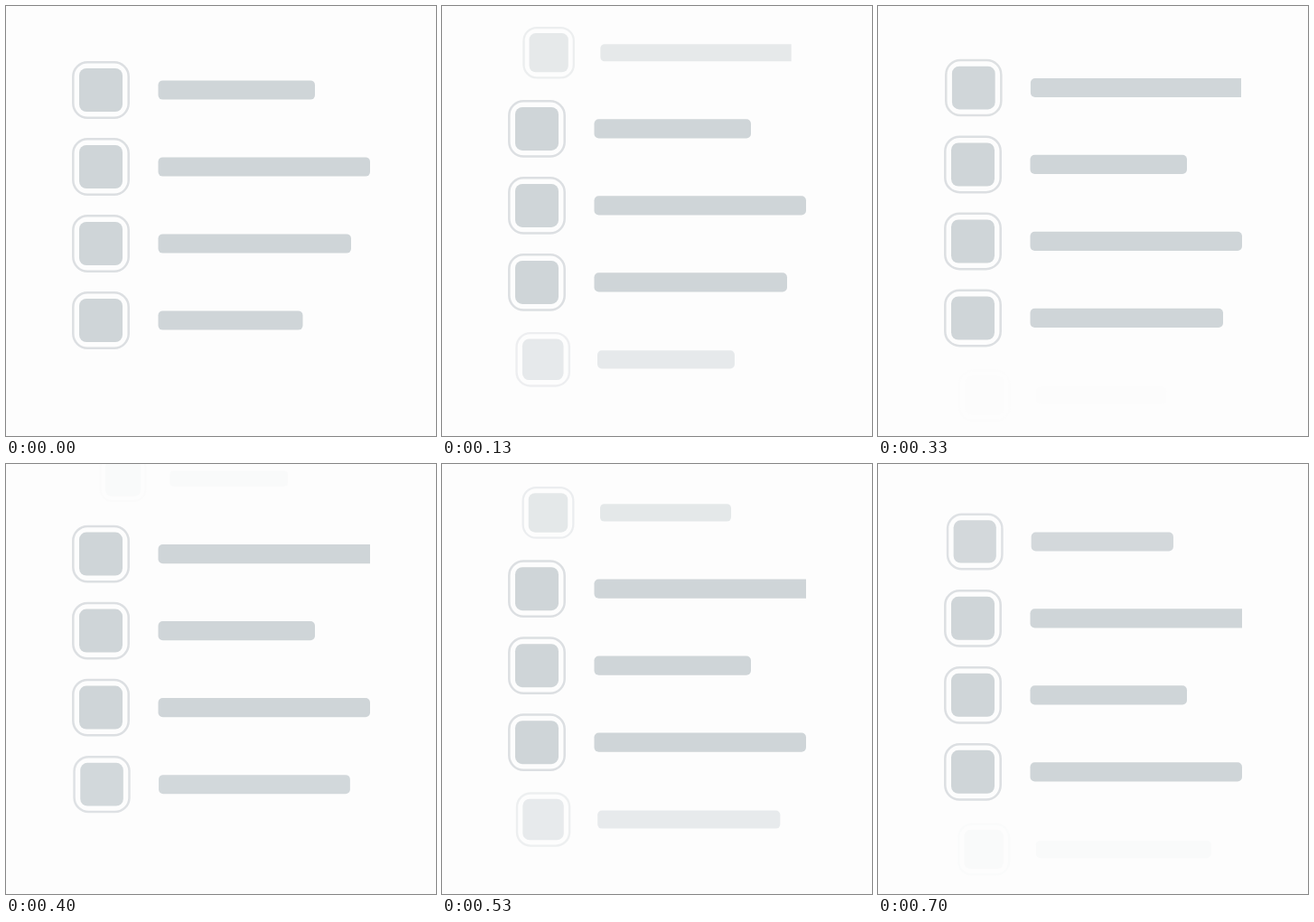
An HTML page with a canvas that plays this animation: 476 by 476 pixels, repeating every 730 ms.

```html
<!DOCTYPE html>
<html lang="en">
<head>
<meta charset="utf-8">
<title>List loop</title>
<style>
  html, body { margin: 0; width: 100%; height: 100%; overflow: hidden; background: #fdfdfd; }
  canvas { display: block; width: 476px; height: 476px; }
</style>
</head>
<body>
<canvas id="stage" width="476" height="476"></canvas>
<script>
const ctx = document.getElementById('stage').getContext('2d');

const LOOP = 730, TICK = 100 / 3, LAST_TICK = 21;
const TOP = 93, PITCH = 85, VISIBLE = 4, CENTER = 238;
const PIVOT = 8; // rows shrink around a point a little below their middle
const FILL = '#cfd5d8', RING = '#dcdfe2';

// Bottom-up order of appearance reversed: the first two rows arrive later.
const rows = [
  { right: 328.5 },
  { right: 403, cut: true },
  { right: 342 },
  { right: 403 },
  { right: 382 },
  { right: 328.5 }
];

// Each step moves the list down by one row; times in ticks.
const steps = [
  { start: 0, length: 11.25 },
  { start: 11.4, length: 12.2 }
];

const clamp = v => Math.min(1, Math.max(0, v));
const easeOut = x => 1 - Math.pow(1 - clamp(x), 1.6);

function box(x, y, w, h, radius) {
  ctx.beginPath();
  ctx.roundRect(x, y, w, h, radius);
}

function drawRow(row, y, scale, alpha) {
  ctx.save();
  ctx.globalAlpha = alpha;
  ctx.translate(CENTER, y + PIVOT);
  ctx.scale(scale, scale);
  ctx.translate(-CENTER, -PIVOT);

  ctx.strokeStyle = RING;
  ctx.lineWidth = 2.5;
  box(74.3, -30.7, 61.4, 61.4, 16);
  ctx.stroke();

  ctx.fillStyle = FILL;
  box(81, -24, 48, 48, 8);
  ctx.fill();
  const end = row.cut ? 0 : 5;
  box(168.5, -10.6, row.right - 168.5, 21.2, [5, end, end, 5]);
  ctx.fill();
  ctx.restore();
}

function draw(time) {
  const tick = Math.min(LAST_TICK, Math.floor((time % LOOP + 5) / TICK));
  const shift = steps.reduce((sum, s) => sum + easeOut((tick - s.start) / s.length), 0);

  ctx.fillStyle = '#fdfdfd';
  ctx.fillRect(0, 0, 476, 476);

  rows.forEach((row, i) => {
    const slot = i - 2 + shift;
    const entered = clamp(slot + 1);
    const left = clamp(slot - VISIBLE + 1);
    const alpha = entered * (1 - left);
    if (alpha <= 0) return;
    const scale = 0.8 + 0.2 * entered - 0.1 * left;
    drawRow(row, TOP + slot * PITCH, scale, alpha);
  });
}

function loop() {
  draw(performance.now());
  requestAnimationFrame(loop);
}
loop();
</script>
</body>
</html>
```
